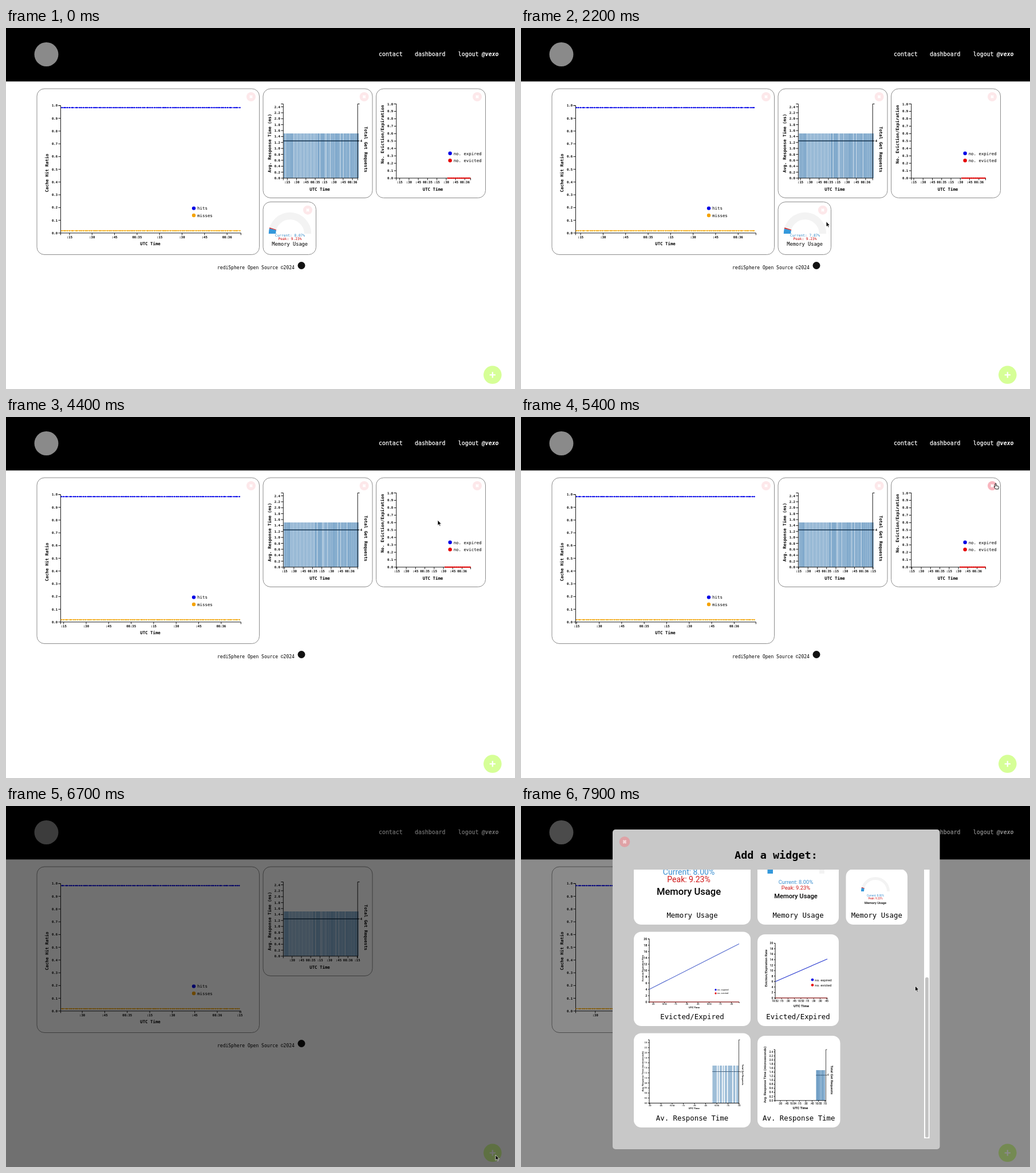
Recreate the animation shown at these times as an HTML page. Size 889 px wide and 630 px high, loop 8 s.

```html
<!DOCTYPE html>
<html lang="en">
<head>
<meta charset="utf-8">
<title>Dashboard</title>
<style>
html, body { margin: 0; width: 100%; height: 100%; overflow: hidden; background: #fff; }
svg { display: block; width: 889px; height: 630px; }
text { font-family: "DejaVu Sans Mono", monospace; white-space: pre; }
.sans text { font-family: Roboto, sans-serif; }
</style>
</head>
<body>
<svg id="stage" viewBox="0 0 889 630" xmlns="http://www.w3.org/2000/svg"></svg>
<script>
const LOOP = 8000, STEP = 100;
const BLUE = '#0000e6', RED = '#e60000', ORANGE = '#f5a300', STEEL = '#4682b4';
const stage = document.getElementById('stage');
const rand = n => { const v = Math.sin(n * 12.9898) * 43758.5453; return v - Math.floor(v); };

// Shape helpers, each returns markup
const rect = (x, y, x2, y2, fill, more = '') =>
  `<rect x="${x}" y="${y}" width="${x2 - x}" height="${y2 - y}" fill="${fill}" ${more}/>`;
const circle = (x, y, r, fill, more = '') => `<circle cx="${x}" cy="${y}" r="${r}" fill="${fill}" ${more}/>`;
const path = (d, stroke, w = 1, more = '') =>
  `<path d="${d}" fill="none" stroke="${stroke}" stroke-width="${w}" ${more}/>`;
const text = (s, x, y, size, o = {}) =>
  `<text x="${x}" y="${y}" font-size="${size}" fill="${o.fill || '#000'}" text-anchor="${o.at || 'start'}"` +
  ` font-weight="${o.w || 400}" ${o.more || ''}>${s}</text>`;
const mid = (s, x, y, size, o = {}) => text(s, x, y, size, { at: 'middle', ...o });
const turned = (s, x, y, size, deg, w = 700) =>
  `<g transform="translate(${x} ${y}) rotate(${deg})">${mid(s, 0, size * .35, size, { w })}</g>`;
const card = (x, y, x2, y2) => rect(x, y, x2, y2, '#fff', 'rx="13" stroke="#8c8c8c" stroke-width="1"');

function closeButton(x, y, hot, r = 8, fill = hot ? '#f9b6bf' : '#fde8ea', ink = '#fff') {
  const a = r * .27;
  return circle(x, y, r, fill) +
    path(`M${x - a} ${y - a}L${x + a} ${y + a}M${x + a} ${y - a}L${x - a} ${y + a}`, ink, r * .28);
}

function yAxis(x, y0, step, count, unit, top, size = 5.6, digits = 1, w = 700, tick = 4) {
  let d = `M${x - tick} ${top}H${x}V${y0}`, out = '';
  for (let i = 0; i < count; i++) {
    const y = y0 - i * step;
    d += `M${x - tick} ${y}H${x}`;
    out += text((i * unit).toFixed(digits), x - tick - 1.5, y + size * .36, size, { at: 'end', w });
  }
  return path(d, '#000', .9) + out;
}

function clockAxis(x, x2, y, first, gap, labels, size = 5.6, w = 700, tick = 3.5) {
  let d = `M${x} ${y + tick}V${y}H${x2}V${y + tick}`, out = '';
  labels.forEach((s, i) => {
    const p = first + i * gap;
    if (p < x || p > x2 + 1) return;
    d += `M${p} ${y}v${tick}`;
    out += mid(s, p, y + tick + size, size, { w });
  });
  return path(d, '#000', .9) + out;
}

const quarter = (a, b) => [':15', ':30', ':45', a, ':15', ':30', ':45', b, ':15', ':30'];
const CLOCK = quarter('08:35', '08:36');
const legend = (x, y, gap, size, r, rows) => rows.map(([s, c], i) =>
  circle(x, y + i * gap, r, c) + text(s, x + r * 1.9, y + i * gap + size * .38, size)).join('');

function dots(y, color, n) {
  let out = path(`M96 ${y}H408`, color, 1.1);
  for (let j = 0; j < 92; j++) {
    const x = 409 - 3.45 * j - rand(n - j + 300) * 2.3;
    if (x > 95.5) out += circle(x.toFixed(2), y, 1.15, color);
  }
  return out;
}

function hitChart(n) {
  return card(54, 106, 442.5, 395.5) + closeButton(428, 120) +
    yAxis(95.5, 357.8, 22.24, 11, .1, 135.4) +
    clockAxis(95.5, 410.3, 357.8, 111 - 3.43 * n, 39.3, CLOCK) +
    dots(139, BLUE, n) + dots(353.8, ORANGE, n) +
    legend(328, 314.6, 12.4, 7.4, 3.2, [['hits', BLUE], ['misses', ORANGE]]) +
    mid('UTC Time', 252, 379.4, 7.4, { w: 700 }) + turned('Cache Hit Ratio', 71, 253, 7.4, -90);
}

// Bar outline for a strip; spacing opens up between u = 16 and u = 58
function bars(shift) {
  let d = '';
  for (let u = 0, k = 0; u < 150; k++) {
    const sparse = u > 16 && u < 58, w = sparse ? 1.75 : 1.35;
    const x = 485 + u - shift;
    if (x >= 484.8 && x < 615) d += `M${x.toFixed(2)} 184h${w}v78h-${w}z`;
    u += sparse ? 2.4 : 1.4 + (rand(k) > .8 ? .7 : rand(k + 50) * .25);
  }
  return `<path d="${d}" fill="${STEEL}" opacity=".72"/>`;
}

function responseChart(n) {
  return card(449, 106, 640, 296.5) + closeButton(625.6, 120) + bars(n * 1.57) +
    path('M484 197H615.5', '#12304d', 1.7) +
    yAxis(484.3, 262, 10.37, 13, .2, 132.5) +
    clockAxis(484.3, 614.3, 262, 491.3 - 1.57 * n, 16.25, CLOCK) +
    path('M617.5 132.5H614.2V262M614.2 197h3.5', '#000', .9) + text('4', 618.8, 199, 5.6, { w: 700 }) +
    mid('UTC Time', 548, 283.6, 7.4, { w: 700 }) +
    turned('Avg. Response Time (ms)', 460, 201, 7.4, -90) + turned('Total Get Requests', 628.5, 212, 7.4, 90);
}

function evictChart(n, hot) {
  const start = 772 - 1.6 * n;
  let out = card(646.5, 106, 837.5, 296.5) + closeButton(823, 120, hot) +
    yAxis(681.7, 262, 12.95, 11, .1, 132.5) +
    clockAxis(681.7, 811.5, 262, 687.6 - 1.6 * n, 16.25, CLOCK) +
    path(`M${start} 262H811.5`, RED, 1.3);
  for (let x = start; x < 811.5; x += 3.3) out += circle(x, 262, 1.25, RED);
  return out + legend(775.6, 218.8, 12.4, 7.4, 3.2, [['no. expired', BLUE], ['no. evicted', RED]]) +
    mid('UTC Time', 745.5, 283.6, 7.4, { w: 700 }) + turned('No. Eviction/Expiration', 657.5, 185.5, 7.4, -90);
}

function arc(cx, cy, r, from, to, color, w) {
  const at = f => `${cx - r * Math.cos(Math.PI * f)} ${cy - r * Math.sin(Math.PI * f)}`;
  return path(`M${at(from)}A${r} ${r} 0 0 1 ${at(to)}`, color, w);
}
const gauge = (cx, cy, r, w, now) => arc(cx, cy, r, 0, 1, '#f3f3f3', w) +
  arc(cx, cy, r, 0, now, '#3498db', w) + arc(cx, cy, r, now, .0923, '#d62020', w);

function memory(now, hot) {
  return card(449, 303.5, 541.5, 395.5) + gauge(496, 359, 31, 12.4, now / 100) + closeButton(527, 317.7, hot) +
    mid(`Current: ${now.toFixed(2)}%`, 496, 363.8, 6.2, { fill: '#2f86c4' }) +
    mid('Peak: 9.23%', 496, 370, 6.2, { fill: '#c80000' }) +
    mid('Memory Usage', 495.7, 380, 8.7);
}

function frame() {
  const ink = 'stroke="#fff" stroke-width=".25"';
  return rect(0, 0, 889, 630, '#fff') + rect(0, 0, 889, 93.3, '#000') + circle(70.5, 46, 21, '#8a8a8a') +
    text('contact', 651, 49.4, 9.9, { fill: '#fff', more: ink }) +
    text('dashboard', 714, 49.4, 9.9, { fill: '#fff', more: ink }) +
    text('logout', 789.8, 49.4, 9.9, { fill: '#fff', more: ink }) +
    text('@vexo', 830.8, 49.4, 9.9, { fill: '#fff', w: 700, more: 'font-style="italic"' }) +
    text('rediSphere Open Source ©2024', 369, 420.5, 8) + circle(516, 414.5, 6.5, '#111');
}

const addButton = hot => circle(849.8, 605.3, 15.8, hot ? '#adff2f' : '#d6ff97') +
  path('M849.8 600.2v10.2M844.7 605.3h10.2', '#fff', 2.3);

// Thumbnails inside the dialog
function memoryThumb(x, ys, sizes) {
  return mid('Current: 8.00%', x, ys[0], sizes[0], { fill: '#3a8fd0' }) +
    mid('Peak: 9.23%', x, ys[1], sizes[0], { fill: '#d01818' }) +
    mid('Memory Usage', x, ys[2], sizes[1], { w: 500 });
}

function evictThumb(o) {
  const { x, x2, y, step, size, from, to, ink, key } = o;
  return yAxis(x, y, step, 11, 2, y - 10 * step, size, 0, 500, 2) +
    clockAxis(x, x2, y, o.first, o.gap, o.labels, o.small, 500, 2) +
    path(`M${x} ${from}L${x2} ${to}`, ink, 1.2) + path(`M${x} ${y}H${x2}`, '#d84848', 1.2) +
    legend(...key, [['no. expired', BLUE], ['no. evicted', RED]]) +
    mid('UTC Time', (x + x2) / 2, o.utc, o.label, { w: 700 }) +
    turned('Eviction/Expiration Rate', o.side, 283, o.label, -90, 500);
}

function responseThumb(o) {
  const { x, x2, y, step, top, barX, barY, line } = o;
  let d = '';
  for (let p = barX, k = 0; p < x2 - 1; k++) {
    d += `M${p} ${barY}h1.7V${y}h-1.7z`;
    p += o.pitch + (rand(k + 7) > .65 ? o.hole : 0);
  }
  return `<path d="${d}" fill="${STEEL}" opacity="${o.alpha}"/>` +
    path(`M${barX} ${line}H${x2}`, '#1d3c5c', 1, 'stroke-dasharray="2 .8"') +
    yAxis(x, y, step, 13, .2, top, o.small, 1, 500, 2) +
    clockAxis(x, x2, y, o.first, o.gap, o.labels, o.small, 500, 2) +
    path(`M${x2 + 2} ${top}H${x2}V${y}M${x2} ${line}h2`, '#000', .7) +
    text('4', x2 + 2.5, line + 1.5, o.small) +
    mid('UTC Time', (x + x2) / 2, o.utc, o.label, { w: 700 }) +
    turned('Avg. Response Time (microseconds)', o.side, o.sideY, o.label, -90, 500) +
    turned('Total Get Requests', o.right, o.rightY, o.label, 90, 500);
}

function dialog() {
  const tile = (x, y, x2, y2, label) => rect(x, y, x2, y2, '#fff', 'rx="13"') +
    mid(label, (x + x2) / 2, y2 - 12.3, 12.35);
  const tiles = tile(197, 40, 401, 207, 'Memory Usage') + tile(413, 60, 555, 207, 'Memory Usage') +
    tile(567.5, 110, 675, 207, 'Memory Usage') +
    tile(197, 219.5, 401, 384, 'Evicted/Expired') + tile(413, 224, 555, 384, 'Evicted/Expired') +
    tile(197, 396.5, 401, 561, 'Av. Response Time') + tile(413, 401, 557.5, 561, 'Av. Response Time');
  const late = CLOCK.slice(2).map(s => s.replace('08:35', '10:52').replace('08:36', '10:53'));
  const later = quarter('10:54', '10:55').slice(1);
  const thumbs = memoryThumb(293, [120, 133.3, 154.6], [14, 16.6]) +
    rect(430.5, 105, 440, 118, '#3498db') + rect(521, 105, 530, 118, '#f3f3f3') +
    memoryThumb(480, [136, 146, 161], [9.4, 11.2]) +
    gauge(619, 149, 22.5, 5, .08) + memoryThumb(619, [158, 163, 170.6], [4.7, 5.6]) +
    evictThumb({ x: 224, x2: 381, y: 342, step: 11, size: 5.6, small: 3.4, first: 231, gap: 19.5, labels: late,
      from: 320, to: 240.5, ink: '#5a6fd0', key: [340, 320.7, 6.2, 4, 1.6], utc: 352.8, label: 4.3, side: 212 }) +
    evictThumb({ x: 444, x2: 535, y: 335, step: 9.55, size: 5.2, small: 4.5, first: 444, gap: 11.2,
      labels: late.slice(1).concat(':30', ':45'), from: 306.5, to: 267, ink: '#2a3bd0',
      key: [509, 303.3, 9.2, 6, 2.3], utc: 351, label: 6.1, side: 427.5 }) +
    responseThumb({ x: 224, x2: 380.5, y: 518.5, step: 8.8, top: 408, barX: 334.5, barY: 453, line: 463.5,
      pitch: 1.9, hole: 1.6, alpha: .58, small: 3.4, first: 225, gap: 19.5, labels: later, utc: 529,
      label: 4.3, side: 212.5, sideY: 463, right: 387.5, rightY: 469 }) +
    responseThumb({ x: 443.5, x2: 532.5, y: 514, step: 7.08, top: 425, barX: 515.5, barY: 461, line: 469.8,
      pitch: 1.8, hole: .4, alpha: .8, small: 4.5, first: 453, gap: 11.1, labels: later, utc: 529,
      label: 6, side: 426, sideY: 469, right: 543, rightY: 478 });
  return rect(160, 41, 731.5, 599, '#c8c8c8', 'rx="5"') + closeButton(181, 62.5, 0, 9.3, '#dfa2a6', '#f3d9db') +
    mid('Add a widget:', 445.5, 92, 18.5, { w: 700 }) +
    `<g clip-path="url(#view)">${tiles}<g class="sans">${thumbs}</g></g>` +
    rect(704, 111, 713.5, 580, '#fff') + rect(706, 299, 711.8, 578.5, '#c2c2c2', 'rx="2.5"');
}

// Pointer route: time, x, y
const ROUTE = [
  [600, 445, 622], [1000, 522, 532], [1300, 548.5, 447], [1400, 547, 429], [1900, 537, 365], [2400, 530.5, 319.5],
  [3900, 530.5, 319.5], [4100, 585, 278], [4400, 754, 180], [4800, 800, 132], [5000, 829, 116], [5500, 829, 116],
  [5700, 838, 308], [5800, 864, 430], [5900, 872, 540], [6000, 855, 609], [7200, 855, 609], [7400, 835, 560],
  [7700, 720, 365], [7900, 688.5, 314]
];
function pointer(t) {
  const i = ROUTE.findIndex(p => p[0] >= t);
  if (i < 1) return ROUTE[0].slice(1);
  const [a, x, y] = ROUTE[i - 1], [b, x2, y2] = ROUTE[i], f = (t - a) / (b - a);
  return [x + (x2 - x) * f, y + (y2 - y) * f];
}
const within = (t, a, b) => t >= a && t < b;
const ticks = (t, first, every) => Math.max(0, Math.floor((t - first) / every) + 1);

const ARROW = '<path d="M0 0V9.2L2.1 7.3L3.6 10.4L5 9.8L3.6 6.8H6.4Z" fill="#000" stroke="#fff" stroke-width=".7"/>';
const HAND = '<path d="M-1 1Q-1-.2 0-.2T1 1V4L4.4 4.7Q5.7 5.1 5.5 6.6L4.8 9.8H0L-2.8 6Q-2.6 4.7-1 5.5Z" ' +
  'fill="#fff" stroke="#000" stroke-width=".9"/>';

const base = frame(), modal = dialog();
const defs = '<defs><clipPath id="view"><rect x="160" y="111" width="540" height="469"/></clipPath></defs>';

function draw(t) {
  const onMemory = within(t, 2400, 3600), onEvict = within(t, 5000, 5500), onAdd = within(t, 6000, 6700);
  let out = defs + base + hitChart(ticks(t, 400, 1340)) + responseChart(ticks(t, 200, 1450));
  if (t < 5500) out += evictChart(ticks(t, 1300, 1400), onEvict);
  if (t < 3600) out += memory(t < 2000 ? 8.07 : 7.87, onMemory);
  if (t >= 6700) out += circle(428, 120, 9, '#fff') + circle(625.6, 120, 9, '#fff');
  out += addButton(onAdd);
  if (t >= 6700) out += rect(0, 0, 889, 630, '#000', `opacity="${t < 6800 ? .56 : .46}"`);
  if (t >= 6800) out += modal;
  if (t >= 600) {
    const [x, y] = pointer(t);
    if (within(t, 3300, 3400) || within(t, 5200, 5300) || within(t, 6500, 6700))
      out += circle(x, y, 16.2, 'none', 'stroke="#fff" stroke-width="1.6"') +
        circle(x, y, 17.8, 'none', 'stroke="#000" stroke-width="2"');
    out += `<g transform="translate(${x} ${y})">${onMemory || onEvict || onAdd ? HAND : ARROW}</g>`;
  }
  stage.innerHTML = out;
}

let last = -1;
const origin = performance.now();
function tick(now) {
  const t = Math.floor((Math.max(0, now - origin) % LOOP) / STEP) * STEP;
  if (t !== last) draw(last = t);
  requestAnimationFrame(tick);
}
draw(last = 0);
requestAnimationFrame(tick);
</script>
</body>
</html>
```
